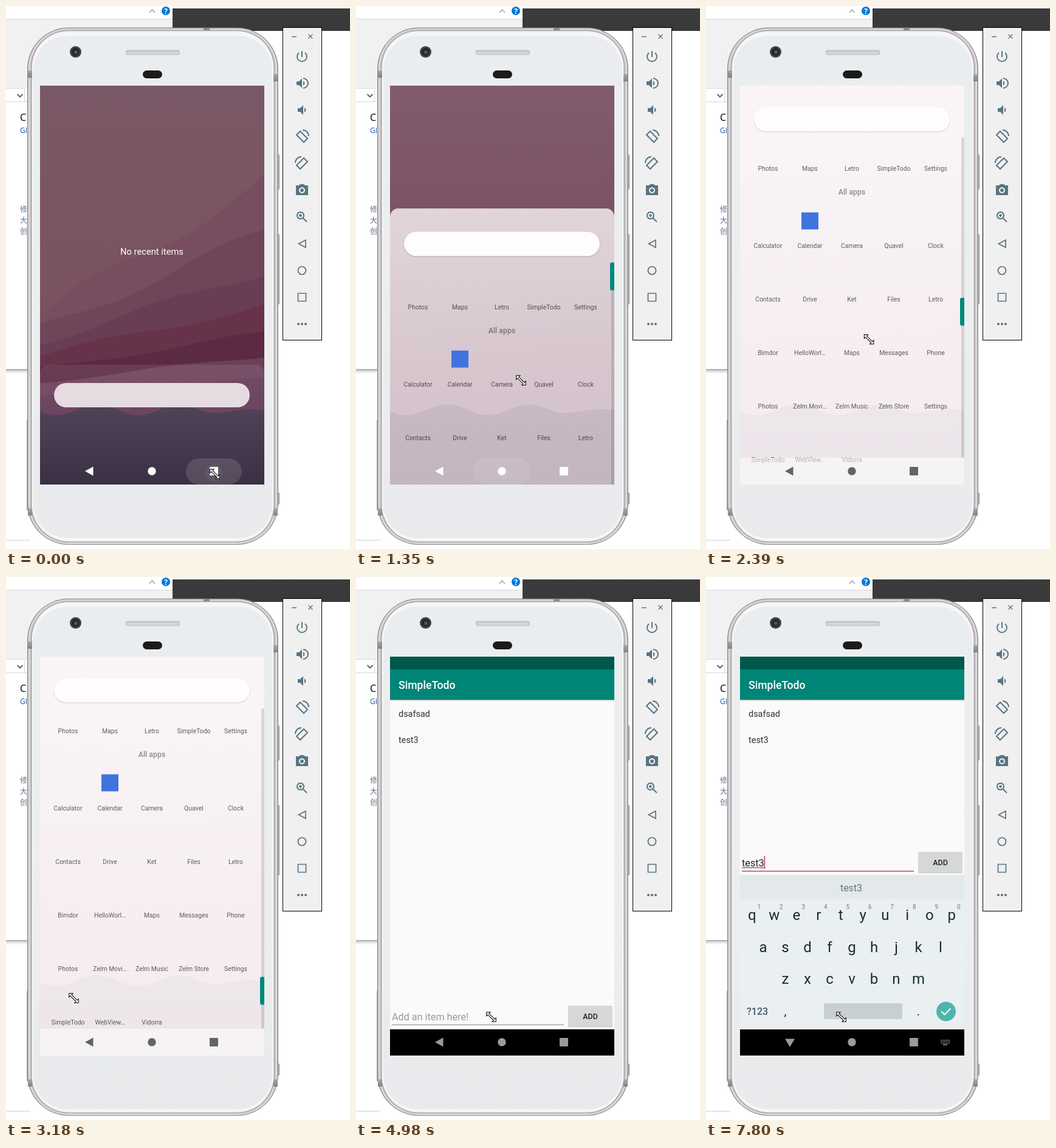
Write an HTML page with a canvas that moves like this. It is 566 px wide and 893 px high and loops after 8000 ms.

```html
<!DOCTYPE html>
<html lang="en">
<head>
<meta charset="utf-8">
<title>Todo app demo</title>
<style>
html, body { margin: 0; width: 100%; height: 100%; overflow: hidden; background: #fff; }
canvas { display: block; }
</style>
</head>
<body>
<canvas id="stage" width="566" height="893"></canvas>
<script>
const LOOP = 8000;
const ctx = document.getElementById('stage').getContext('2d');
const FONT = 'Roboto, sans-serif';
const SANS = '"Open Sans", sans-serif';
const SCREEN = { x: 56, y: 131, w: 369, h: 656, right: 425, bottom: 787 };

const progress = (t, from, to) => Math.min(1, Math.max(0, (t - from) / (to - from)));
const mix = (a, b, u) => a + (b - a) * u;
const easeOut = u => 1 - (1 - u) ** 2.5;
const white = a => `rgba(255,255,255,${a})`;
const black = a => `rgba(0,0,0,${a})`;

function rect(x, y, w, h, fill, r = 0) {
  ctx.fillStyle = fill;
  ctx.beginPath();
  ctx.roundRect(x, y, w, h, r);
  ctx.fill();
}
function disc(x, y, r, fill) {
  ctx.fillStyle = fill;
  ctx.beginPath();
  ctx.arc(x, y, r, 0, 7);
  ctx.fill();
}
function poly(points, fill, stroke) {
  ctx.beginPath();
  points.forEach(([x, y]) => ctx.lineTo(x, y));
  ctx.closePath();
  ctx.fillStyle = fill;
  ctx.fill();
  if (stroke) { ctx.strokeStyle = stroke; ctx.lineWidth = 1; ctx.stroke(); }
}
// Fills the screen below the curve y = f(x)
function below(f, fill) {
  const points = [[SCREEN.right, SCREEN.bottom], [SCREEN.x, SCREEN.bottom]];
  for (let x = SCREEN.x; x <= SCREEN.right; x += 3) points.push([x, f(x)]);
  poly(points, fill);
}
function text(str, x, y, size, fill, align = 'left', weight = 400, family = FONT) {
  ctx.font = `${weight} ${size}px ${family}`;
  ctx.textAlign = align;
  ctx.fillStyle = fill;
  ctx.fillText(str, x, y);
}
function vGrad(y0, y1, ...colors) {
  const g = ctx.createLinearGradient(0, y0, 0, y1);
  colors.forEach((c, i) => g.addColorStop(i / (colors.length - 1), c));
  return g;
}
function line(path, color, width = 2) {
  ctx.strokeStyle = color;
  ctx.lineWidth = width;
  ctx.stroke(new Path2D(path));
}

// ---- Desktop, phone body and toolbar ----
function drawDesktop() {
  rect(0, 0, 566, 893, '#fff');
  rect(274, 0, 292, 5, '#f4f7f5');
  rect(274, 4, 292, 37, vGrad(4, 41, '#3b3b3b', '#393939'));
  rect(0, 21, 274, 115, '#d9d9d9');
  rect(0, 22, 274, 113, '#f1f1f1');
  rect(0, 157, 35, 1, '#d5d5d5');
  rect(30, 137, 1, 20, '#d5d5d5');
  line('M18.5 145l4.5 4.5 4.5-4.5', '#666');
  line('M236 11l4.5-5 4.5 5', '#999', 1.2);
  disc(263, 8, 7, '#0078d7');
  text('?', 263, 12.5, 12, '#fff', 'center', 700, SANS);
  text('C', 23, 189, 16, '#000', 'left', 400, SANS);
  text('GI', 23, 209, 12, '#1e4fa8', 'left', 400, SANS);
  [...'修大创'].forEach((c, i) =>
    text(c, 23, 339 + 18 * i, 12, '#5f6f8c', 'left', 400, '"Noto Sans CJK SC", "Noto Sans CJK", sans-serif'));
  rect(0, 597, 36, 8, vGrad(597, 605, '#a5a5a5', '#e4e4e4', '#fff'));
  rect(0, 878, 40, 1, '#d0d0d0');
}

function drawPhone() {
  for (const [y, h] of [[244, 58], [375, 116], [800, 20]]) rect(446, y, 4.5, h, '#b5b0b3', 2);
  rect(34, 680, 4, 150, '#aaa6a9', 2);
  // Nested rims: inset from the outline and colour
  for (const [d, color] of [[0, '#8f888b'], [1.5, '#e0dbdd'], [4, '#cbc5c8'], [6, '#a8a1a5'], [7.5, '#f5f6f7']])
    rect(35 + d, 35.5 + d * .75, 413 - 2 * d, 850.5 - 1.5 * d, color, 68 - d);
  rect(45, 49, 393, 826, vGrad(49, 875, '#eaedef', '#eceeef', '#e8eaec'), 56);
  for (const [x, y] of [[36, 106], [36, 826], [440, 112], [440, 826]])
    rect(x, y, 7, 12, vGrad(y, y + 12, '#aaa6a9', '#858184'));
  rect(325, 36, 10, 4, '#8d898b');
  disc(114.5, 75.5, 9.5, '#414247');
  disc(114.5, 75.5, 6.5, '#24252b');
  disc(115, 76, 3, '#50535f');
  rect(197, 72.5, 89, 8, '#bbbdc0', 3);
  rect(198, 74.5, 87, 5, '#d4d5d7', 2.5);
  rect(225, 106, 32, 13, '#1b1b1c', 6.5);
}

// Toolbar icons on a 24-unit grid: outline, then solid part
const PHONE = 'M9 3l12 12-6 6L3 9z';
const SPEAKER = 'M3 9v6h4l5 5V4L7 9z';
const ICONS = [
  ['M12 3v10M7 6a8 8 0 1 0 10 0'],
  ['M14 4a8 8 0 0 1 0 16', SPEAKER + 'M14 8a4.5 4.5 0 0 1 0 8z'],
  ['', 'M5 9v6h4l5 5V4L9 9zM16 8a4.5 4.5 0 0 1 0 8z'],
  [PHONE + 'M13 1a10 10 0 0 1 10 10'],
  [PHONE + 'M13 1a10 10 0 0 1 10 10'],
  ['', 'M9 2L7 4H2v16h20V4h-5l-2-2zM12 7a5 5 0 1 0 .01 0zM12 9a3 3 0 1 0 .01 0z'],
  ['M9.5 4a5.500 5.500 0 1 0 .01 0zM14 14l6 6M9.5 7v5M7 9.500h5'],
  ['M18 6v12L6.500 12z'],
  ['M12 5.500a6.500 6.500 0 1 0 .01 0z'],
  ['M5.500 5.500h13v13h-13z'],
  ['', [6, 12, 18].map(x => `M${x} 10a2 2 0 1 0 .01 0z`).join('')]
];
function drawToolbar() {
  const c = '#587483';
  rect(455, 35, 65, 515, '#000');
  rect(456, 36, 63, 513, '#f0f0f0');
  line('M470 50.5h8M497.5 46.5l7 7m0-7l-7 7', c, 1.3);
  ICONS.forEach(([outline, solid], i) => {
    ctx.save();
    ctx.translate(487, 83 + 44 * i);
    if (i === 4) ctx.scale(-1, 1);
    ctx.translate(-12, -12);
    line(outline, c, i > 6 ? 1.7 : 2);
    ctx.fillStyle = c;
    if (solid) ctx.fill(new Path2D(solid), 'evenodd');
    ctx.restore();
  });
}

// ---- Launcher ----
const LABELS = [
  'Photos,Maps,Letro,SimpleTodo,Settings',
  'Calculator,Calendar,Camera,Quavel,Clock',
  'Contacts,Drive,Ket,Files,Letro',
  'Bimdor,HelloWorl…,Maps,Messages,Phone',
  'Photos,Zelm Movi…,Zelm Music,Zelm Store,Settings',
  'SimpleTodo,WebView…,Vidorra'
].map(row => row.split(','));
const DUSK = ['#774d5f', '#6f4559', '#693d53', '#67334a', '#5c2a43', '#6c4059', '#633b57'];

const hills = x => 664 - 9 * Math.cos((x - 150) / 21.5) * Math.min(1, (420 - x) / 120);

function drawWallpaper() {
  rect(56, 131, 369, 656, vGrad(131, 500, '#7a5866', '#79535f'));
  // Each lower band of the sky slopes less
  DUSK.forEach((color, i) => below(x => {
    const u = (x - SCREEN.x) / SCREEN.w, drop = 222 * .72 ** i;
    return 509 + 22 * i - drop * u - drop * .06 * Math.sin(7 * u + 2 * i);
  }, color));
  below(hills, vGrad(655, 787, '#46384d', '#3a3044'));
}

function drawLauncher(t) {
  const p = .15 * progress(t, 1030, 1240) + .85 * easeOut(progress(t, 1240, 1740));
  const shown = progress(p, 0, .15), full = progress(p, .15, .95);
  const top = mix(590, 119, p);
  const bar = top + 50 + 17 * full;
  const pull = easeOut(progress(t, 2190, 2850));
  const row = bar + 103.5 - 37 * pull;

  drawWallpaper();
  ctx.globalAlpha = .8 * shown;
  rect(56, 131, 369, 656, vGrad(131, 520, '#825d6d', '#7d5365', '#6d3a53'));
  ctx.globalAlpha = 1 - progress(p, .1, .6);
  drawWallpaperBelow(top, shown);
  text('No recent items', 240, 409 - 40 * p, 14.7 - 2 * p, '#fff', 'center');
  ctx.globalAlpha = 1;

  const sheet = a => `rgba(255,250,252,${a})`;
  ctx.save();
  ctx.beginPath();
  ctx.roundRect(56, top, 369, 900, 14);
  ctx.clip();
  rect(56, top, 369, 900, vGrad(top, 787,
    sheet(.09 + .5 * shown + .38 * full), sheet(.47 * shown + .45 * full)));
  below(hills, `rgba(70,75,100,${.13 * shown - .09 * full})`);
  ctx.restore();

  ctx.save();
  ctx.shadowColor = black(.25 * shown - .1 * full);
  ctx.shadowBlur = 2;
  ctx.shadowOffsetY = 1;
  rect(79, bar - 20, 322, 40, `rgba(255,252,253,${mix(.82, 1, shown)})`, 20);
  ctx.restore();

  ctx.globalAlpha = shown;
  LABELS.forEach((names, r) => names.forEach((name, i) =>
    text(name, 102 + 69 * i, row + 4 + (r && 39 + 88 * r), 10.4, black(.62), 'center')));
  text('All apps', 240, row + 43, 12.4, black(.43), 'center', 500);
  rect(420, bar + 30, 5, 527, black(.13), 2);
  rect(418, bar + 30.5 + 441 * pull, 8, 46, '#00897b', 3);
  rect(56, bar + 557, 369, 100, white(.55));
  rect(157, row + 72, 28, 28, '#3f74dd');
  ctx.globalAlpha = 1;

  rect(296, 744, 92, 43, white(.13 * (1 - progress(t, 1030, 1120))), 22);
  disc(342, 768, 14, white(.06 * (1 - progress(t, 0, 200))));
  rect(193, 743, 95, 44, white(.14 * (progress(t, 1030, 1100) - progress(t, 1240, 1500))), 22);
  drawNav(mix(255, 100, progress(t, 1450, 1740)));
}

// Keeps the evening sky visible through the translucent sheet
function drawWallpaperBelow(top, shown) {
  if (!shown) return;
  ctx.save();
  ctx.beginPath();
  ctx.rect(56, top + 14, 369, 787 - top);
  ctx.clip();
  drawWallpaper();
  ctx.restore();
}

function drawNav(level, keyboard) {
  const c = `rgb(${level},${level},${level})`;
  poly(keyboard ? [[130, 759.5], [146, 759.5], [138, 773]] : [[143.5, 757.5], [143.5, 772.5], [130, 765]], c);
  disc(240, 765, 6.7, c);
  rect(335, 758, 14, 14, c, 1);
  if (!keyboard) return;
  for (let i = 0; i < 18; i++) rect(386.5 + 2.6 * (i % 6), 761 + 2.6 * (i / 6 | 0), 1.5, 1.5, c);
  rect(390, 768.5, 7, 1.5, c);
}

// ---- Todo app ----
const KEY_TIMES = [7030, 7210, 7285, 7360, 7800];
const HINTS = ['thanks,I,we', 'to,t,them', 'tell,te,team', 'tea,tes,test', 'tests,test,Test', 'test3'];
const typedCount = t => KEY_TIMES.filter(k => t >= k).length;

function drawApp(t) {
  const e = easeOut(progress(t, 3530, 3960));
  const open = t >= 6100;
  ctx.save();
  ctx.beginPath();
  ctx.roundRect(mix(102, 56, e), mix(691, 131, e), 369 * e, 656 * e, 20 * (1 - e));
  ctx.clip();
  rect(56, 131, 369, 656, '#fafafa');
  rect(56, 131, 369, 21, '#00574b');
  if (t >= 4260) drawTodo(t, open ? 452 : 705);
  rect(56, 743, 369, 1, '#cfd2d2');
  rect(56, 744, 369, 43, '#000');
  if (open) drawKeyboard(t);
  drawNav(mix(255, 154, progress(t, 4300, 4980)), open);
  ctx.restore();
}

function drawTodo(t, y) {
  const typed = 'test3'.slice(0, typedCount(t));
  const focus = t >= 5990;
  ctx.globalAlpha = progress(t, 4180, 4380);
  rect(56, 202, 369, 3, vGrad(202, 205, '#cfcfcf', '#fafafa'));
  rect(56, 152, 369, 50, '#008577');
  text('SimpleTodo', 70, 184, 17.7, '#fff', 'left', 500);
  text('dsafsad', 70, 230, 14.45, '#333');
  text('test3', 70, 273, 14.45, '#333');
  text(typed || 'Add an item here!', 59, y + 24, 16.2, typed ? '#222' : '#999');
  const w = typed ? ctx.measureText(typed).width : 0;
  rect(59, y + 25.5, w, 1, '#333');
  rect(59, y + 31, 283, focus ? 1.5 : 1, focus ? '#c94468' : '#8a8a8a');
  if (focus) rect(59 + w, y + 7, 1.5, 21, '#d02560');
  rect(349, y + 1, 73, 34, '#c4c5c5', 2);
  rect(349, y, 73, 34, '#d6d7d7', 2);
  text('ADD', 385.5, y + 21.5, 12.5, '#222', 'center', 500);
  ctx.globalAlpha = 1;
}

function drawKeyboard(t) {
  const ink = '#172c36';
  const rise = easeOut(progress(t, 6100, 6510));
  ctx.save();
  ctx.translate(0, 72 * (1 - rise));
  ctx.globalAlpha = rise;
  rect(56, 490, 369, 40, '#e3e8eb');
  rect(56, 530, 369, 214, '#eaeff2');
  const hints = HINTS[typedCount(t)].split(',');
  const several = hints.length > 1;
  hints.forEach((h, i) => {
    if (i) rect(77 + 108 * i, 500, 1, 22, '#bcc5c9');
    text(h, several ? 137 + 102 * i : 239, 516.5, 16, '#6b777d', 'center');
  });
  ['qwertyuiop', 'asdfghjkl', 'zxcvbnm'].forEach((keys, r) => [...keys].forEach((k, i) => {
    const x = 240 + 36.5 * (i - (keys.length - 1) / 2);
    text(k, x, 564 + 52.7 * r, 24, ink, 'center');
    if (!r) text((i + 1) % 10, x + 11.5, 546, 10, '#6d7c84', 'center');
  }));
  text('?123', 67, 719.5, 16, '#455a64', 'left', 500);
  text(',', 130.5, 721, 20, ink, 'center');
  text('.', 349.5, 721, 20, ink, 'center');
  rect(194, 701, 129, 26, '#c8cfd3', 3);
  disc(395, 714.5, 16, '#4db6ac');
  line('M387.5 714.5l5 5 10-10', '#fff');
  ctx.restore();
}

// Pointer moves: start, end, destination
const MOVES = [
  [1020, 1030, 255, 762], [1030, 1240, 270, 617], [1240, 1590, 273, 611],
  [2190, 2600, 262, 482], [3170, 3180, 111, 692], [4600, 4980, 222, 723]
];
function drawCursor(t) {
  let x = 343, y = 769;
  for (const [from, to, x1, y1] of MOVES) {
    const u = progress(t, from, to);
    x = mix(x, x1, u);
    y = mix(y, y1, u);
  }
  ctx.save();
  ctx.translate(x + .5, y + .5);
  ctx.rotate(Math.PI / 4);
  const half = [[-11, 0], [-6.5, -4.5], [-6.5, -1.4], [6.5, -1.4], [6.5, -4.5]];
  poly([...half, ...half.map(([a, b]) => [-a, -b])], '#fff', '#000');
  ctx.restore();
}

const start = performance.now();
function frame() {
  const t = (performance.now() - start) % LOOP;
  ctx.save();
  ctx.beginPath();
  ctx.rect(SCREEN.x, SCREEN.y, SCREEN.w, SCREEN.h);
  ctx.clip();
  if (t < 3960) drawLauncher(t);
  if (t >= 3530) drawApp(t);
  drawCursor(t);
  ctx.restore();
  requestAnimationFrame(frame);
}

drawDesktop();
drawPhone();
drawToolbar();
frame();
</script>
</body>
</html>
```
